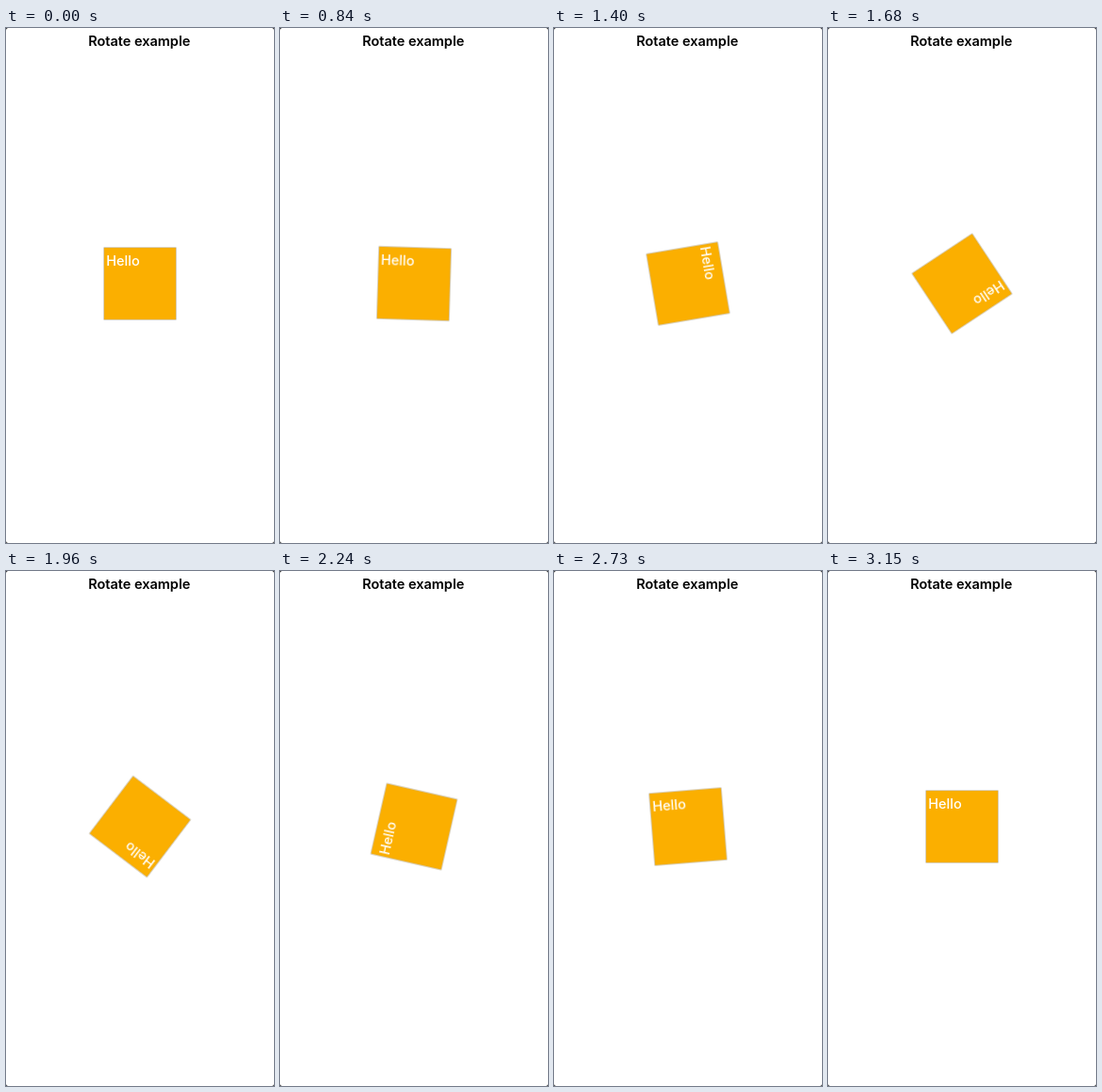
Animation, 284 px wide and 546 px high, one loop 3.36 s. Source, as an HTML page:

```html
<!DOCTYPE html>
<html lang="en">
<head>
<meta charset="utf-8">
<title>Rotate example</title>
<style>
  html, body { margin: 0; width: 100%; height: 100%; overflow: hidden; background: #fff; }
  svg { display: block; width: 100vw; height: 100vh; }
  text { font: 500 14.5px Inter, Roboto, sans-serif; }
  .title { font-weight: 600; }
  #box {
    transform-origin: 142px 271px;
    animation: spin 3360ms infinite paused;
  }
  /* one turn, from 755 ms to 2870 ms */
  @keyframes spin {
    0% { transform: rotate(0deg); }
    22.47% { transform: rotate(0deg); animation-timing-function: cubic-bezier(.33, 0, .67, 1); }
    85.42%, 100% { transform: rotate(360deg); }
  }
</style>
</head>
<body>
<svg viewBox="0 0 284 546" preserveAspectRatio="none">
  <rect width="284" height="546" fill="#222"/>
  <rect width="284" height="546" rx="2.5" fill="#fff"/>
  <text class="title" x="141.2" y="19.2" text-anchor="middle" fill="#000">Rotate example</text>
  <g id="box">
    <rect x="103.8" y="232.8" width="76.4" height="76.4" fill="#fbaf00" stroke="#a8a8a8" stroke-opacity=".7" stroke-width=".7"/>
    <text x="106.3" y="251.5" fill="#fff">Hello</text>
  </g>
</svg>
<script>
  const LOOP = 3360, STEP = 70;
  const box = document.getElementById('box');

  // The turn advances in 70 ms ticks.
  function draw() {
    const time = Math.floor(performance.now() % LOOP / STEP) * STEP;
    box.style.animationDelay = -time + 'ms';
    requestAnimationFrame(draw);
  }
  draw();
</script>
</body>
</html>
```
